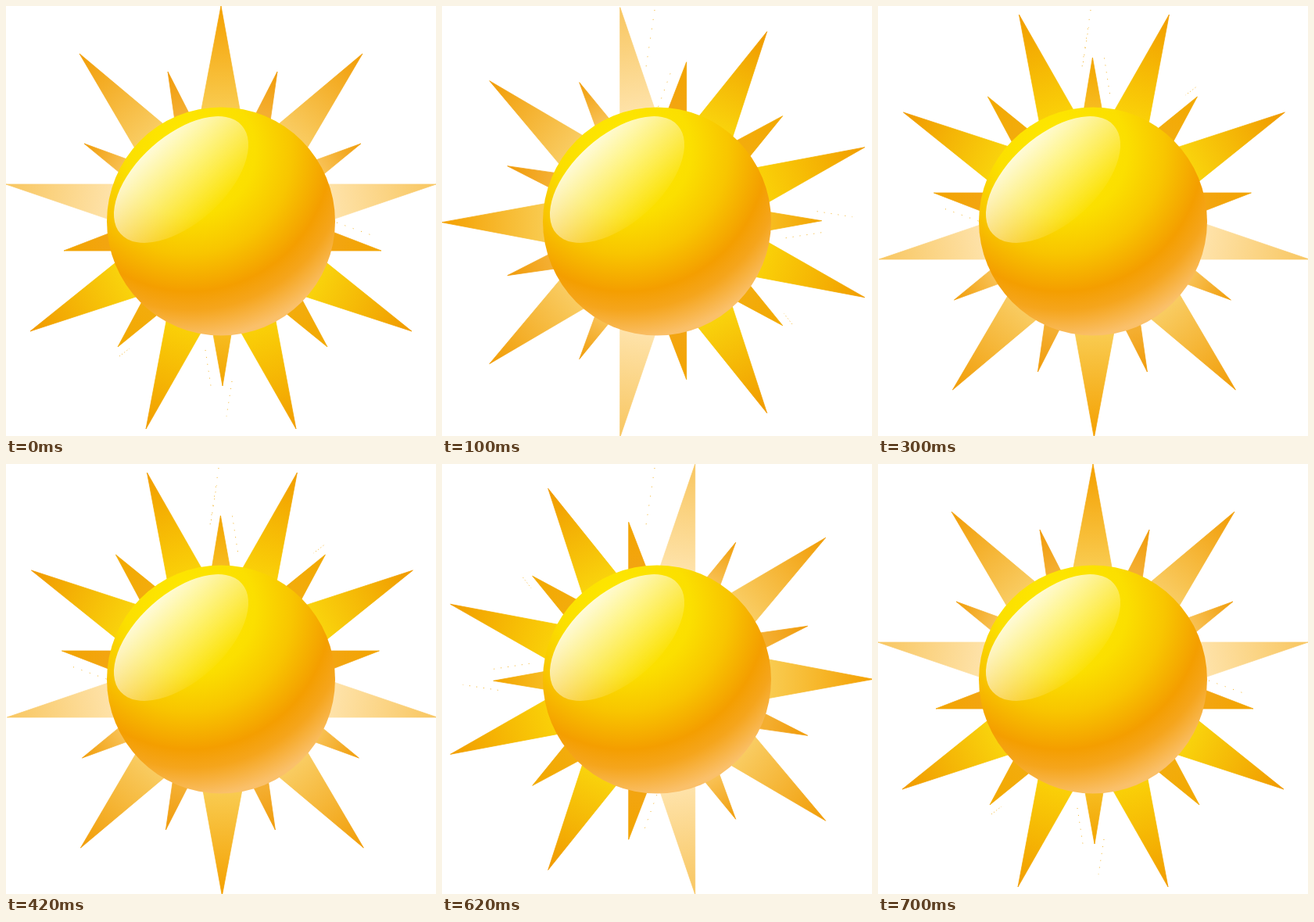
An HTML page with a canvas for the animation above (800 ms loop, 550 px wide and 550 px high).

```html
<!DOCTYPE html>
<html lang="en">
<head>
<meta charset="utf-8">
<title>Turning sun</title>
<style>
html, body { margin: 0; background: #fff; overflow: hidden; }
canvas { display: block; }
</style>
</head>
<body>
<canvas id="stage" width="550" height="550"></canvas>
<script>
const ctx = document.getElementById('stage').getContext('2d');
const LOOP = 800, STEP = 200, PIVOT_X = 275.7, PIVOT_Y = 276;

// Left half of the crown: tip, two base points, tip colour, base colour
const bigRays = [
  [275, 0, 250, 132, 299, 132, '#f4a000', '#f9cb50'],
  [94, 61, 165, 182, 200, 150, '#f19c05', '#f9cc62'],
  [0, 228, 135, 228, 129, 272, '#f8c660', '#fee2a8'],
  [31, 416, 138, 330, 163, 373, '#f09800', '#f9d20c'],
  [179, 541, 205, 403, 248, 420, '#f19c00', '#fad008']
];
const smallRays = [
  [207, 84, 215, 140, 232, 133, '#f09a08', '#f4ae30'],
  [100, 176, 145, 213, 155, 196, '#f09c08', '#f8c052'],
  [74, 313, 131, 291, 131, 313, '#f2a400', '#f3a510'],
  [143, 436, 173, 380, 191, 397, '#f2a800', '#f3ac0c'],
  [277, 486, 265, 420, 288, 420, '#f2a400', '#f7bc20']
];

function gradient(fill, stops) {
  for (const [at, color] of stops) fill.addColorStop(at, color);
  return fill;
}

function ray([x, y, ax, ay, bx, by, tip, base]) {
  const reach = 1.15; // run the base under the ball
  ctx.fillStyle = ctx.strokeStyle = gradient(
    ctx.createLinearGradient(x, y, (ax + bx) / 2, (ay + by) / 2),
    [[0, tip], [1, base]]);
  ctx.beginPath();
  ctx.moveTo(x, y);
  ctx.lineTo(x + (ax - x) * reach, y + (ay - y) * reach);
  ctx.lineTo(x + (bx - x) * reach, y + (by - y) * reach);
  ctx.closePath();
  ctx.fill();
  ctx.stroke();
}

function mirrored(rays, axis) {
  ctx.setLineDash([]);
  ctx.lineWidth = 0.8;
  ctx.lineJoin = 'round';
  for (const r of rays) {
    ray(r);
    if (r[0] !== axis) ray(r.map((v, i) => i < 6 && i % 2 === 0 ? 2 * axis - v : v));
  }
}

function specks(x1, y1, x2, y2, gap) {
  ctx.strokeStyle = '#f2b01e';
  ctx.lineWidth = 1;
  ctx.setLineDash([1, gap]);
  ctx.beginPath();
  ctx.moveTo(x1, y1);
  ctx.lineTo(x2, y2);
  ctx.stroke();
}

function ball() {
  ctx.fillStyle = gradient(ctx.createRadialGradient(235, 185, 0, 235, 185, 240), [
    [0, '#ffea00'], [.35, '#fbdf00'], [.55, '#f8c500'],
    [.75, '#f49e00'], [.85, '#f5a51c'], [1, '#fac06a']]);
  ctx.beginPath();
  ctx.arc(275, 275.5, 146, 0, 7);
  ctx.fill();

  ctx.fillStyle = gradient(ctx.createLinearGradient(184, 182, 264, 262),
    [[0, 'rgba(255,255,255,.85)'], [1, 'rgba(255,255,255,.03)']]);
  ctx.beginPath();
  ctx.ellipse(224, 222, 104, 56, -.73, 0, 7);
  ctx.fill();
}

function draw(now) {
  const quarter = Math.floor((now % LOOP + STEP / 2) / STEP) % 4;
  ctx.clearRect(0, 0, 550, 550);
  ctx.save();
  ctx.translate(PIVOT_X, PIVOT_Y);
  ctx.rotate(-quarter * Math.PI / 2);
  ctx.translate(-PIVOT_X, -PIVOT_Y);
  mirrored(smallRays, 277);
  mirrored(bigRays, 275);
  specks(255, 440, 262, 486, 8);
  specks(289, 480, 282, 525, 8);
  specks(145, 448, 158, 438, 3);
  specks(423, 277, 470, 294, 10);
  ctx.restore();
  if (quarter) specks(272, 5, 261, 78, 11);
  ball();
}

const start = performance.now();
function tick() {
  draw(performance.now() - start);
  requestAnimationFrame(tick);
}
tick();
</script>
</body>
</html>
```
